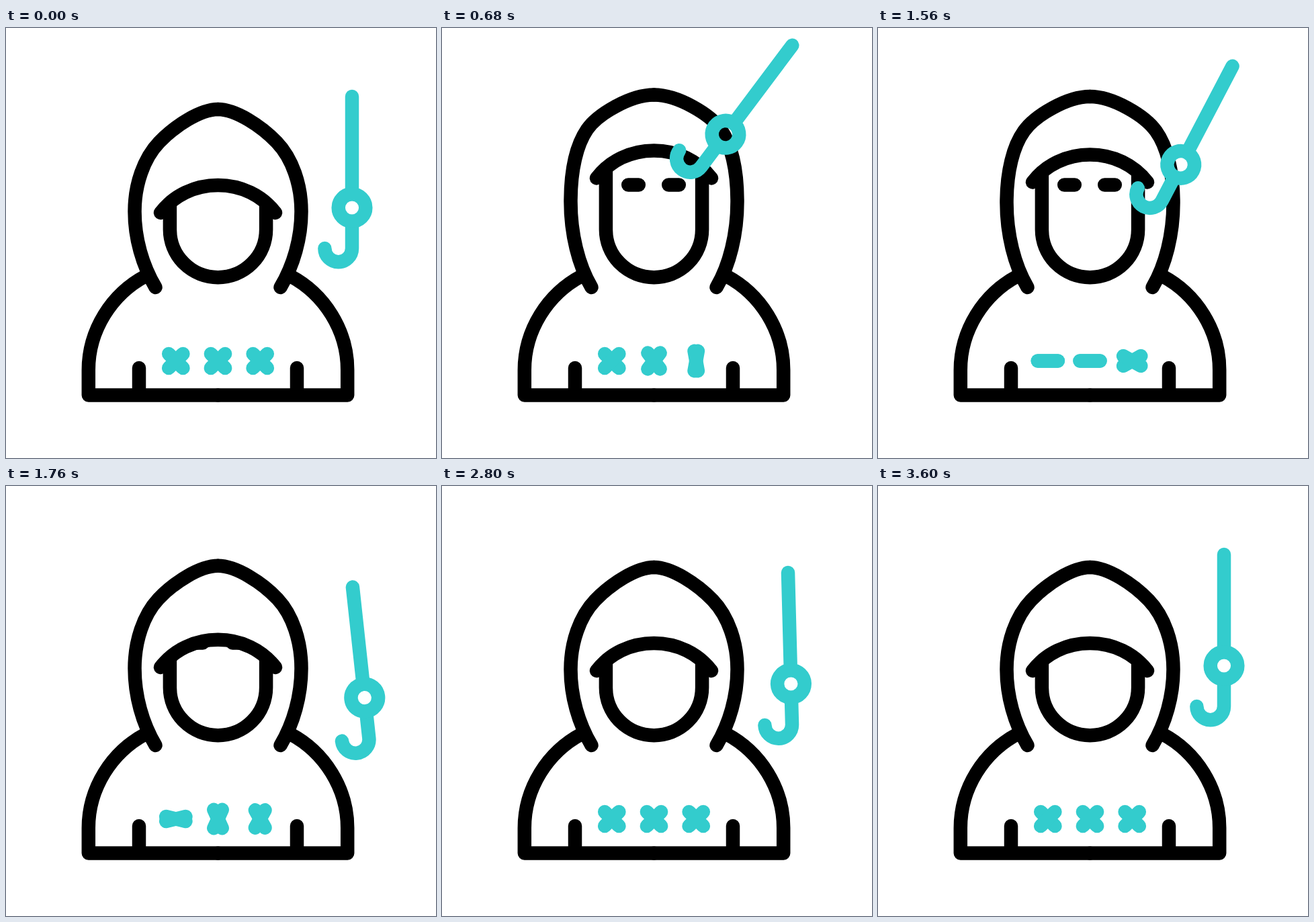
These frames come from a looping animation (640 px wide and 640 px high, 3620 ms). An HTML page:

```html
<!DOCTYPE html>
<html lang="en">
<head>
<meta charset="utf-8">
<title>Hooded figure and hook</title>
<style>
  html, body { margin: 0; width: 100%; height: 100%; overflow: hidden; background: #fff; }
  svg { display: block; width: 100vw; height: 100vh; }
  path, circle, line { fill: none; stroke: #000; stroke-width: 20.5; stroke-linecap: round; stroke-linejoin: round; }
  .accent * { stroke: #33cccd; }
  #shade { fill: #fff; stroke: none; }
  #face { stroke-linecap: butt; }
</style>
</head>
<body>
<svg viewBox="0 0 640 640">
  <path id="face" d="M243.9 203V300A71.6 71.2 0 0 0 387.1 300V203"/>
  <path d="M277.2 233.5h15.6M337.2 233.5h15.6"/>
  <g id="brim">
    <path id="shade" d="M230 275C250 249 281 234 315.5 234S381 249 401 275V185H230Z"/>
    <path d="M230 275C250 249 281 234 315.5 234S381 249 401 275"/>
  </g>
  <g id="half">
    <path d="M208 369C157 396 122.8 450 122.8 509V546.5H315.5M198 546V506"/>
    <path id="hood"/>
  </g>
  <use href="#half" transform="translate(631 0) scale(-1 1)"/>
  <g id="marks" class="accent"></g>
  <g id="hook" class="accent">
    <path d="M0 0V145M0 186V226A20.3 20.3 0 0 1 -40.6 226"/>
    <circle cy="165.5" r="20.3"/>
  </g>
</svg>
<script>
const LOOP = 3620;
const RELEASE = 1433;
const $ = id => document.getElementById(id);

// Smooth rise from 0 to 1.
function step(t, start, duration) {
  const x = Math.min(1, Math.max(0, (t - start) / duration));
  return x * x * (3 - 2 * x);
}

// Smooth rise to 1, later a smooth return to 0.
const pulse = (t, rise, fall, duration) => step(t, rise, duration) - step(t, fall, duration);

// Each mark is two strokes turning in opposite directions.
const marks = [0, 1, 2].map(i => [1, -1].map(direction => {
  const line = document.createElementNS('http://www.w3.org/2000/svg', 'line');
  line.setAttribute('x1', -15);
  line.setAttribute('x2', 15);
  $('marks').append(line);
  return { line, direction, x: 252.8 + 62.7 * i, delay: 122 * (2 - i) };
})).flat();

function drawFigure(t) {
  const lift = pulse(t, 375, RELEASE, 400);
  $('brim').setAttribute('transform', `translate(0 ${-60 * lift})`);
  $('hood').setAttribute('d', `M222.5 386
    C203 353 191.5 ${313 - 8 * lift} 191.5 ${273 - 17 * lift}
    S${205 - 5 * lift} ${194 - 24 * lift} ${228 - 14 * lift} ${170 - 22 * lift}
    S${289 - 11 * lift} ${121 - 25 * lift} 315.5 ${121 - 25 * lift}`);
}

function drawMarks(t) {
  for (const { line, direction, x, delay } of marks) {
    const angle = 45 + 135 * pulse(t - delay, 500, 1437, 412);
    line.setAttribute('transform', `translate(${x} 495.5) rotate(${direction * angle})`);
  }
}

// The hook swings in, pulls the brim up, drops, then sways while it rises again.
function drawHook(t) {
  const reach = step(t, 100, 267);
  const pull = step(t, 367, 433);
  const drop = step(t, RELEASE, 382);
  const rise = step(t, 2033, 1500);
  const x = 515 - 41 * reach + 58 * pull - 17 * drop;
  const y = 102 - 55 * reach - 26 * pull + 137 * drop - 56 * rise;

  const sway = 10.5, decay = sway / 4;
  let turn = 24 * reach + 15.8 * pull - (39.8 + sway) * step(t, RELEASE, 400);
  for (let i = 0; i < 4; i++) {
    const sweep = 2 * (sway - decay * i) - decay;
    turn += (-1) ** i * sweep * step(t, RELEASE + 400 + 390 * i, 390);
  }
  $('hook').setAttribute('transform', `translate(${x} ${y}) rotate(${turn})`);
}

function frame() {
  const t = performance.now() % LOOP;
  drawFigure(t);
  drawMarks(t);
  drawHook(t);
  requestAnimationFrame(frame);
}
frame();
</script>
</body>
</html>
```
